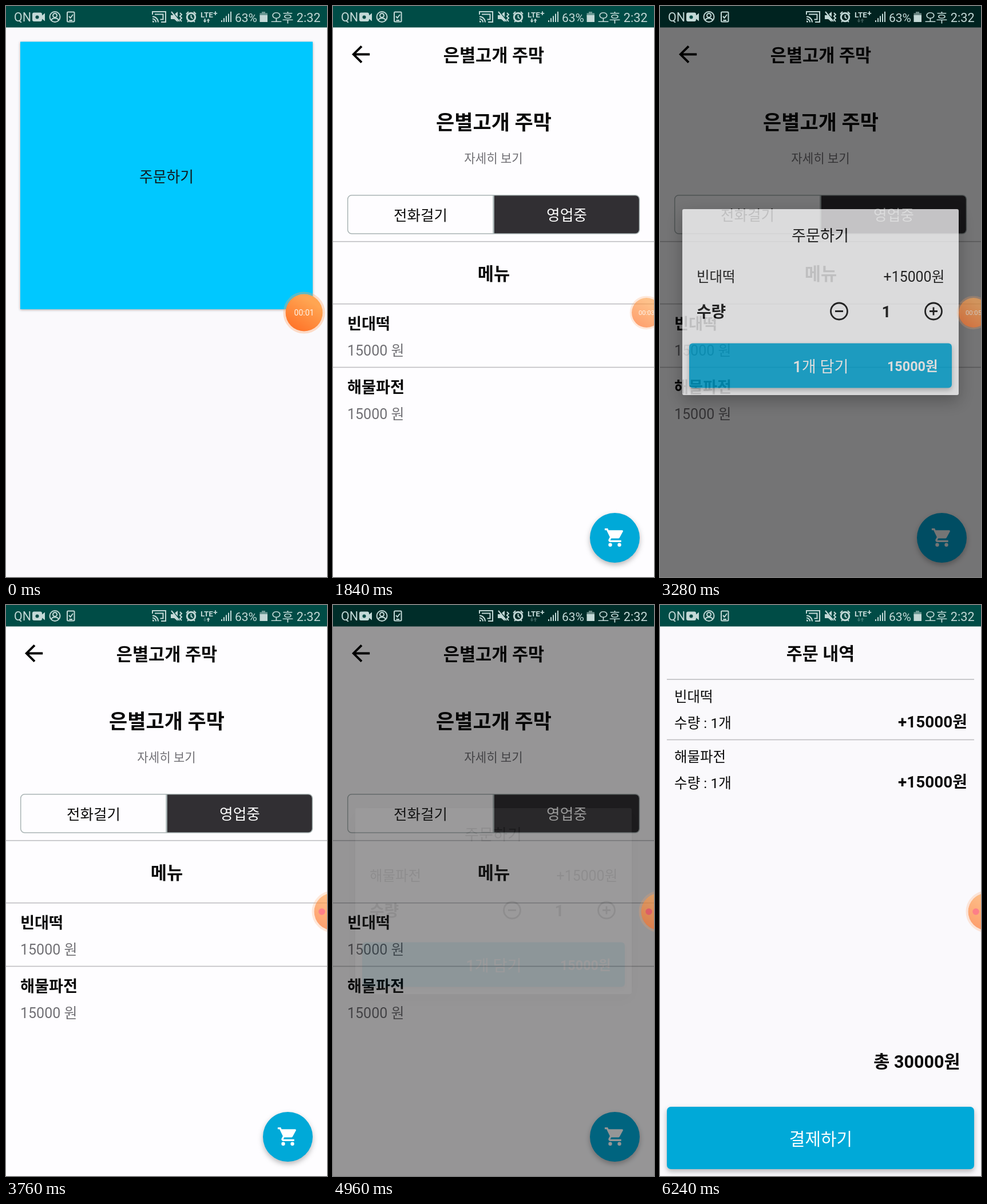
An HTML page that plays this animation: 561 by 998 pixels, repeating every 8000 ms.

```html
<!DOCTYPE html>
<html lang="ko">
<head>
<meta charset="utf-8">
<style>
html, body { margin: 0; width: 100%; height: 100%; overflow: hidden; background: #faf9fc; }
svg { display: block; width: 561px; height: 998px; font-family: Roboto, "Noto Sans CJK KR", "Noto Sans CJK", sans-serif; }
.low { filter: drop-shadow(0 1px 2px rgba(0,0,0,.35)); }
.mid { filter: drop-shadow(0 4px 5px rgba(0,0,0,.28)); }
.high { filter: drop-shadow(0 10px 14px rgba(0,0,0,.35)); }
</style>
</head>
<body>
<svg id="stage" viewBox="0 0 561 998"></svg>
<script>
const LOOP = 8000, TICK = 80;
const BLUE = '#00a9d8', PALE = '#faf9fc', WHITE = '#fefdff', GREY = '#717075', ICON = '#c3d8d6';
const SHOP = '은별고개 주막';

const text = (x, y, size, str, { w = 400, at = 'middle', fill = '#0a0a0a', id = '' } = {}) =>
  `<text x="${x}" y="${y}" font-size="${size}" font-weight="${w}" text-anchor="${at}" fill="${fill}" id="${id}">${str}</text>`;
const rect = (x, y, w, h, fill, extra = '') =>
  `<rect x="${x}" y="${y}" width="${w}" height="${h}" fill="${fill}" ${extra}/>`;
const rule = (y, x1 = 0, x2 = 561) => rect(x1, y - .8, x2 - x1, 1.6, '#bebec1');
const bold = { w: 700 }, left = { at: 'start' }, boldLeft = { w: 700, at: 'start' };

const home = `
  ${rect(0, 0, 561, 998, PALE)}
  ${rect(25, 62.5, 511, 467.5, '#00c8ff', 'class="low"')}
  <clipPath id="card">${rect(25, 62.5, 511, 467.5, '#000')}</clipPath>
  <circle id="ripple" cx="290" cy="330" clip-path="url(#card)" opacity=".1"/>
  ${text(280.5, 308, 25.8, '주문하기', { w: 500, fill: '#10191c' })}`;

const menuItem = (y, name) => text(25, y, 27.2, name, boldLeft) +
  text(25, y + 46.5, 25, '15000 원', { at: 'start', fill: GREY });

const shop = `
  ${rect(0, 0, 561, 1100, WHITE)}
  <path transform="translate(25.2 61.1) scale(1.95)" d="M20 11H7.83l5.59-5.59L12 4l-8 8 8 8 1.41-1.41L7.83 13H20z"/>
  ${text(280.5, 274, 21.2, '자세히 보기', { fill: GREY })}
  ${text(153, 375, 25.5, '전화걸기', { w: 500 })}
  <g id="closed">${text(408.5, 375, 25.6, '영업 준비중', { w: 500 })}</g>
  <g id="open">
    ${text(281, 96.5, 30.6, SHOP, bold)}
    ${text(281, 216, 35, SHOP, bold)}
    <path d="M281 331H529a6 6 0 0 1 6 6V392a6 6 0 0 1-6 6H281z" fill="#312f33"/>
    ${text(408.5, 375, 25.7, '영업중', { w: 500, fill: '#fff' })}
    ${rule(411.7)}${rule(520.7)}${rule(631.5)}
    ${text(281, 479, 30.7, '메뉴', bold)}
    ${menuItem(564.5, '빈대떡')}${menuItem(675.5, '해물파전')}
  </g>
  ${rect(25.7, 330.7, 509.8, 67.3, 'none', 'rx="7" stroke="#a9b4b4" stroke-width="1.5"')}
  ${rect(279.3, 331, 2.6, 67, '#a9b4b4')}
  <circle cx="492.5" cy="929.5" r="43.5" fill="${BLUE}" class="mid"/>
  <circle id="tap" cx="492.5" cy="929.5" r="43.5" fill="#fff" opacity=".2"/>
  <path transform="translate(473.3 909.8) scale(1.6)" fill="#fff" d="M7 18a2 2 0 1 0 0 4 2 2 0 0 0 0-4zM1 2v2h2l3.6 7.59-1.35 2.45c-.16.28-.25.61-.25.96 0 1.1.9 2 2 2h12v-2H7.42c-.14 0-.25-.11-.25-.25l.03-.12.9-1.63h7.45c.75 0 1.41-.41 1.75-1.03l3.58-6.49A1 1 0 0 0 20 4H5.21l-.94-2zM17 18a2 2 0 1 0 0 4 2 2 0 0 0 0-4z"/>`;

const orderItem = (y, name) => text(25, y, 24.5, name, left) +
  text(25, y + 46.5, 24.6, '수량 : 1개', left) +
  text(537, y + 45.7, 27.9, '+15000원', { w: 700, at: 'end' });

const order = `
  ${rect(0, 0, 561, 1100, PALE)}
  ${text(280.5, 96, 30.4, '주문 내역', bold)}
  ${rule(130, 12, 549)}${orderItem(168.5, '빈대떡')}
  ${rule(235.5, 12, 549)}${orderItem(273.5, '해물파전')}
  ${text(524.5, 809, 30.5, '총 30000원', { w: 700, at: 'end' })}
  ${rect(12, 877, 537, 109, BLUE, 'rx="7" class="mid"')}
  ${text(281, 944, 30, '결제하기', { w: 500, fill: '#fff' })}`;

const dialog = `
  ${rect(39, 355, 483, 325, '#fefeff', 'rx="3" class="high"')}
  ${text(280, 410.5, 27.2, '주문하기', { w: 500 })}
  ${text(64, 481.5, 24.5, '', { at: 'start', id: 'dish' })}
  ${text(497.5, 482, 24.9, '+15000원', { at: 'end' })}
  ${text(64, 544, 27.8, '수량', boldLeft)}
  ${text(395.5, 544, 28, '1', bold)}
  <path d="M306 533.5h14M471 533.5h14M478 526.5v14M298.5 533.5a14.5 14.5 0 1 0 29 0a14.5 14.5 0 1 0-29 0M463.5 533.5a14.5 14.5 0 1 0 29 0a14.5 14.5 0 1 0-29 0" fill="none" stroke="#0a0a0a" stroke-width="2.8"/>
  ${rect(51, 589.5, 459, 78, BLUE, 'rx="6" class="mid"')}
  ${text(281, 640, 27.2, '1개 담기', { w: 500, fill: '#fff' })}
  ${text(485.5, 638, 23.4, '15000원', { w: 700, at: 'end', fill: '#fff' })}`;

const bars = [0, 1, 2, 3, 4].map(i => rect(376 + i * 4, 25 - i * 3.8, 2, 3 + i * 3.8, ICON)).join('');
const status = `
  ${text(14, 27, 21.5, 'QN', left)}
  <path d="M49 11.5h11a3 3 0 0 1 3 3v2l5-4v14l-5-4v1.500a3 3 0 0 1-3 3h-11a3 3 0 0 1-3-3v-9.500a3 3 0 0 1 3-3z"/>
  <circle cx="54.500" cy="19.500" r="3" fill="#004c46"/>
  <g fill="none" stroke="${ICON}" stroke-width="2">
    <circle cx="85.500" cy="19" r="9"/><circle cx="85.500" cy="16.500" r="3.500"/><path d="M79 25c2-5 11-5 13 0"/>
    <rect x="107" y="10.500" width="12.500" height="17" rx="1.500"/><path d="M110 18l2.500 3 4.500-6M110.500 25h5.500"/>
    <path d="M256 15v-5h23v18h-8M256 18.500a10 10 0 0 1 10 10M256 22.500a6 6 0 0 1 6 6M260 14.500h14.500v9h-5"/>
    <path d="M289 10l14 17M304 12l3 3-3 3 3 3-3 3 3 3" />
    <circle cx="323.500" cy="19.500" r="7.200" stroke-width="3"/><path d="M323.500 15.500v4.500l3 2M315 14l4-4M332 14l-4-4M317 28l2-2M330 28l-2-2"/>
  </g>
  <path d="M288 16h4l1-1 7 9v4l-6-5h-6zM295 14l5-4v9.500zM256 25.500a3 3 0 0 1 3 3h-3z"/>
  ${text(340, 20, 13.5, 'LTE', boldLeft)}${text(362.3, 16.5, 13.5, '+', boldLeft)}
  <path id="down" d="M346.500 22h2v3.500h2l-3 3.500-3-3.500h2z"/>
  <path id="up" d="M352.500 29h2v-3.500h2l-3-3.500-3 3.500h2z"/>
  ${bars}
  ${text(400, 27.5, 21, '63%', left)}
  <path d="M447 10h6v2.500h4v6h-13.500v-6h3.500z" opacity=".55"/>${rect(443.5, 16, 13.5, 12, ICON)}
  ${text(462.5, 27.5, 21.7, '오후 2:32', left)}`;

const bubble = `
  <circle r="34.500" fill="none" stroke="#ffa466" stroke-width="4" opacity=".35"/>
  <circle r="32.500" fill="url(#orange)"/>
  ${text(0, 5, 14, '', { fill: '#fff3e6', id: 'clock' })}
  <circle id="dot" cx="-19" r="5.800" fill="#ff4450"/>`;

document.getElementById('stage').innerHTML = `
  <linearGradient id="orange" x1=".8" y1="0" x2=".2" y2="1"><stop offset=".2" stop-color="#ffa552"/><stop offset="1" stop-color="#ff7026"/></linearGradient>
  <g>${home}</g><g id="shop">${shop}</g><g id="order">${order}</g>
  ${rect(0, 0, 561, 37.5, '#004c46')}
  ${rect(0, 0, 561, 998, '#000', 'id="scrim"')}
  <g id="dialog">${dialog}</g>
  <g id="status">${status}</g><g id="bubble">${bubble}</g>`;

const el = id => document.getElementById(id);
const set = (id, attrs) => { for (const k in attrs) el(id).setAttribute(k, attrs[k]); };
const clamp = v => Math.max(0, Math.min(1, v));
for (const node of el('status').querySelectorAll('text, :scope > path')) node.setAttribute('fill', ICON);

// Value of the last [time, value] pair already reached.
const hold = (t, ...pairs) => pairs.filter(([at]) => t >= at).pop()[1];

// New screens fade in while sliding up.
function enter(id, t, start) {
  const p = clamp((t - start + TICK) / 240);
  set(id, { opacity: clamp(p * 1.5), transform: `translate(0 ${80 * (1 - p) ** 3})` });
}

function draw(now) {
  const t = Math.floor(now % LOOP / TICK) * TICK;
  enter('shop', t, 720);
  enter('order', t, 6080);

  const press = clamp((t - 160) / 320);
  set('ripple', { r: t < 240 || t >= 560 ? 0 : 420 * press });
  set('tap', { visibility: t >= 5920 && t < 6240 ? 'visible' : 'hidden' });
  set('closed', { visibility: t < 1520 ? 'visible' : 'hidden' });
  set('open', { visibility: t < 1520 ? 'hidden' : 'visible' });

  set('scrim', { opacity: hold(t, [0, 0], [2560, .52], [2640, .57], [2720, .6], [3280, .54], [3360, .36], [3440, 0],
    [4160, .6], [4960, .41], [5040, .15], [5120, 0]) });
  set('dialog', { opacity: hold(t, [0, 0], [2560, 1], [3280, .75], [3360, .04], [3440, 0],
    [4160, 1], [4960, .05], [5040, 0]) });
  el('dish').textContent = t < 4000 ? '빈대떡' : '해물파전';

  set('down', { opacity: t < 2960 ? 1 : .3 });
  set('up', { opacity: hold(t, [0, 1], [2960, .3], [3760, 1], [4640, .3]) });

  const docked = t >= 3360, slide = 1 - (1 - clamp((t - 160) / 400)) ** 2;
  const x = docked ? 571 : 521 + 27 * slide, scale = docked ? 1 : 1 - .2 * slide;
  set('bubble', { transform: `translate(${x} 536) scale(${scale})`, opacity: 1 - .33 * slide });
  set('dot', { visibility: docked ? 'visible' : 'hidden' });
  el('clock').textContent = hold(t, [0, '00:01'], [400, '00:02'], [1840, '00:03'], [3120, '00:05'], [3360, '']);
}

const begin = performance.now();
function loop() {
  draw(performance.now() - begin);
  requestAnimationFrame(loop);
}
loop();
</script>
</body>
</html>
```
